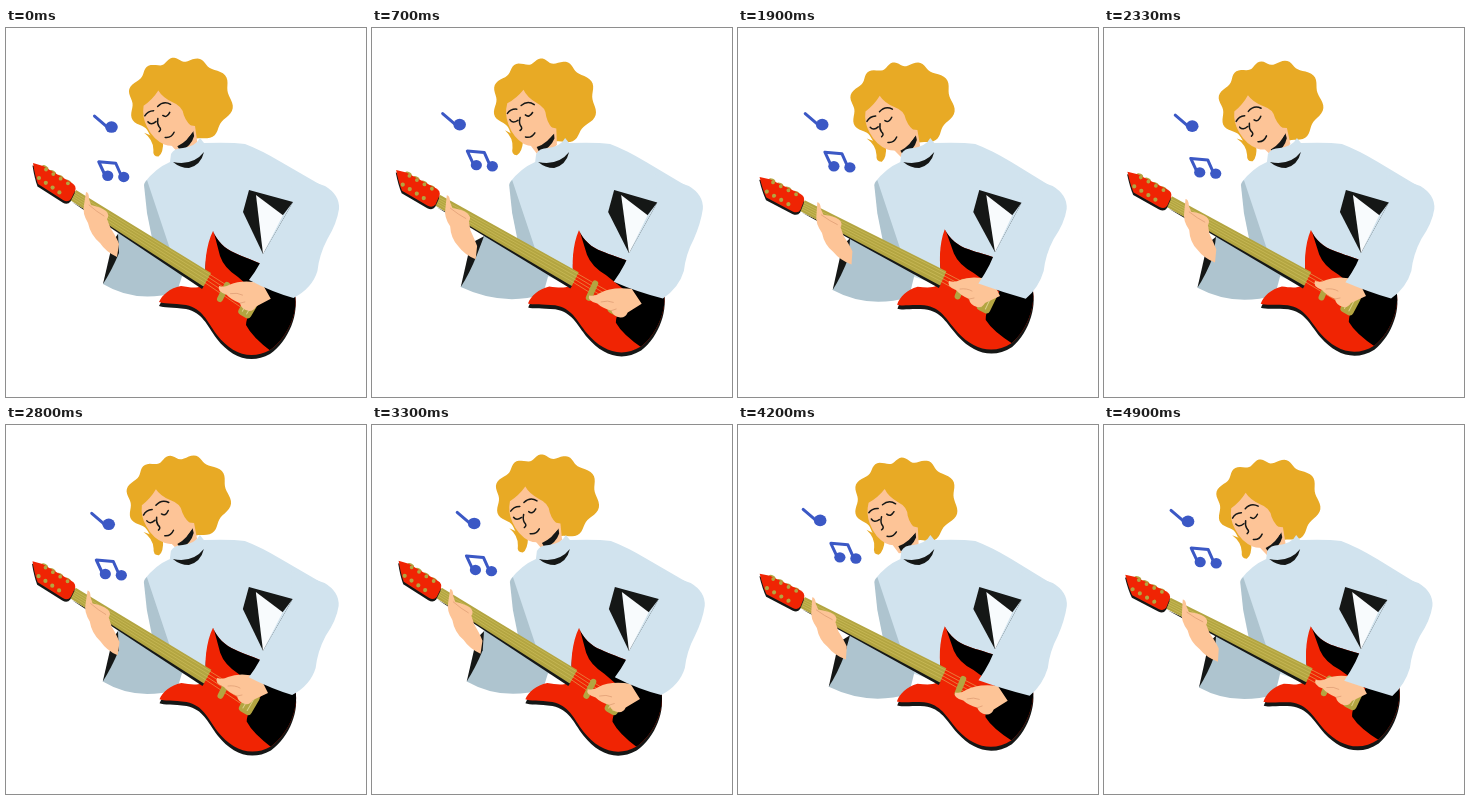
Write an HTML page with a canvas that moves like this. It is 360 px wide and 369 px high and loops after 5 s.

```html
<!DOCTYPE html>
<html lang="en">
<head>
<meta charset="utf-8">
<title>Guitarist</title>
<style>
  html, body { margin: 0; width: 100%; height: 100%; overflow: hidden; background: #fff; }
  canvas { display: block; }
</style>
</head>
<body>
<canvas id="stage" width="360" height="369"></canvas>
<script>
const ctx = document.getElementById('stage').getContext('2d');
const LOOP = 5000, SWAY = 3070;
const INK = '#151716', BLACK = '#000', RED = '#f02403', OLIVE = '#b3a541', SKIN = '#fdc497',
      CREASE = '#dd9b72', HAIR = '#e8aa25', CLOTH = '#d1e3ee', SHADE = '#aec4cf', BLUE = '#3b58c5';
const { sin, cos, PI } = Math;

const fill = (color, path) => { ctx.fillStyle = color; ctx.fill(new Path2D(path)); };
const line = (color, width, path) => {
  ctx.strokeStyle = color;
  ctx.lineWidth = width;
  ctx.stroke(new Path2D(path));
};
const dot = (color, x, y, rx, ry = rx, turn = 0) => {
  ctx.fillStyle = color;
  ctx.beginPath();
  ctx.ellipse(x, y, rx, ry, turn, 0, 2 * PI);
  ctx.fill();
};
const group = (draw) => { ctx.save(); draw(); ctx.restore(); };
const rotateAt = (x, y, angle) => {
  ctx.translate(x, y);
  ctx.rotate(angle);
  ctx.translate(-x, -y);
};

function drawNotes(phase) {
  const x = 91 + 11 * cos(phase) - 1.5 * sin(phase) + 3.5 * cos(2 * phase);
  const y = 97.3 + 2 * cos(phase + .5);
  line(BLUE, 3, `M${x - 17} ${y - 11}L${x - 3} ${y + 1}`);
  dot(BLUE, x, y, 6.3, 5.8);

  const px = 100 + 4.5 * sin(phase + .4);
  const py = 140.5 + 8.5 * cos(phase + .55);
  line(BLUE, 3, `M${px - 2} ${py + 1}l-7 -15l17 1.5l6 13.5`);
  dot(BLUE, px, py, 5.6, 5.2);
  dot(BLUE, px + 16, py + 1.2, 5.6, 5.2);
}

// Curls: a lobed closed curve around the head
function drawCurls() {
  ctx.fillStyle = HAIR;
  ctx.beginPath();
  for (let a = 0; a < 2 * PI; a += .05) {
    const r = 46 + 4.5 * cos(2 * a) + 3 * (cos(a) + sin(a)) + 2.5 * cos(10 * a - 2.1);
    ctx.lineTo(172 + r * cos(a), 70 + r * sin(a));
  }
  ctx.fill();
  fill(HAIR, 'M138 104Q147 111 147 121Q146 128 152 128Q157 125 157 112Z');
}

function drawHead(k, tilt) {
  group(() => {
    ctx.translate(-11 * k, 5 * k);
    rotateAt(172, 75, .09 * tilt);
    drawCurls();
    fill(SKIN, 'M170 95L189 98L191 114Q185 124 172 125L164 116Z');
    fill(INK, 'M171 118Q182 113 187 102L188 108Q185 118 174 123Z');
    fill(SKIN, `M153 62Q147 71 138 77Q136 88 141 98Q147 111 158 116Q168 120 177 113
      Q185 107 189 101Q181 96 178 87Q177 78 167 74Q157 69 153 62Z`);
    line(INK, 1.5, `M139 87Q142 82 148 82M152 78Q158 72 165 76
      M142 93Q145 97 150 93M157 87Q161 90 164 84
      M152 90Q151 95 153 98Q156 101 153 103M159 109Q165 110 168 104`);
  });
}

function drawTorso(k) {
  group(() => {
    ctx.translate(-2 * k, 0);
    fill(CLOTH, `M139 154Q150 140 164 134L165 126Q168 120 177 120Q190 118 194 110L198 115
      Q225 114 239 116Q255 122 275 134L${320 - 3 * k} 160L300 250L200 256L172 247L160 230Z`);
    fill(SHADE, 'M138 157Q138 155 141 152L173 248L160 240L147 215L141 185Z');
    fill(INK, 'M167 134Q187 138 198 124Q195 137 183 140Q174 140 167 134Z');
  });
}

function drawCuff(k, s) {
  const x = 97 - 2 * k - 2.5 * s - 5 * s * s, y = 256 + 7 * k, top = 205 + 5 * k;
  fill(SHADE, `M112 ${top}L${x} ${y}Q130 ${276 + 6 * k} 171 ${264 + 6 * k}L177 245L150 ${215 + 3 * k}Z`);
  fill(INK, `M${x + 10} ${top + 8}L${x} ${y}Q${x + 9} ${y - 14} ${x + 16} ${top + 20}L112 ${top + 1}Z`);
}

function drawGuitar() {
  const body = `M207 203C211 213 219 221 229 225C245 233 277 240 288 263
    C294 280 283 309 264 322C244 333 225 325 211 307C200 292 197 281 180 277
    C167 275 157 276 153 274C156 267 164 260 175 258C187 260 197 262 200 251
    C198 238 200 217 207 203Z`;
  group(() => { ctx.translate(0, 4); fill(INK, body); });
  fill(RED, body);
  group(() => {
    ctx.clip(new Path2D(body));
    fill(BLACK, 'M207 201L214 228Q218 240 232 249L256 270Q240 286 240 297Q246 309 266 324L305 310L300 225Z');
  });

  fill(INK, 'M66 174L110 199L198 258L196 261Z');
  fill(OLIVE, 'M70 162L205 245L197.5 258.5L64 172Z');
  for (let o = -1.5; o < 2; o++) {
    const x = 202 - o * 1.7, y = 251 + o * 2.7;
    line('#d0c15f', .6, `M${67 - o * 1.1} ${167 + o * 1.8}L${x} ${y}`);
    line('#e98a45', .8, `M${x} ${y}L${243 - o * 2.2} ${278 + o * 3}`);
  }
  line(OLIVE, 6, 'M221 257L214 271');
  group(() => {
    rotateAt(243, 278, .54);
    ctx.fillStyle = OLIVE;
    ctx.beginPath();
    ctx.roundRect(236, 267, 14, 23, 4);
    ctx.fill();
    line('#ddd08a', 1, 'M240 271V286M245 271V286');
  });

  const head = 'M27 135L37 138L66 155Q71 158 69 163L65 171Q62 175 57 172L32 156Q29 148 27 135Z';
  for (let i = 0; i < 4; i++) dot(OLIVE, 39 + i * 7.6, 140 + i * 4.8, 3.6, 2.4, .5);
  group(() => { ctx.translate(-.5, 2.5); fill(INK, head); });
  fill(RED, head);
  for (let i = 0; i < 4; i++) {
    dot(OLIVE, 33 + i * 6.8, 150 + i * 4.8, 2.1);
    dot(OLIVE, 40 + i * 7.3, 141.5 + i * 4.6, 1.9);
  }
}

function drawFretHand(s) {
  const w = -1 - 5 * s * s;
  group(() => {
    ctx.translate(-3.5 * s, -1.5 * s - 1);
    fill(SKIN, `M80 165Q83 165 83 172L85 178Q95 180 100 184Q104 188 101 192L${105 + w / 2} 201
      Q${112 + w} 211 ${114 + w} 217L${112 + w} 230Q${101 + w} 225 ${95 + w} 216
      Q${85 + w / 2} 208 82 196Q76 186 78 178Z`);
    line(CREASE, .7, 'M83 178Q91 185 98 189');
  });
}

// Strum runs from -1 (raised) to 1 (lowered)
function drawStrumHand(strum) {
  const k = (strum + 1) / 2;
  group(() => {
    ctx.translate(7 * k, 9 * k);
    rotateAt(252, 262, -.13 * k);
    fill(SKIN, `M211 253Q217 255 222 252Q234 247 254 252L262 268L247 275Q244 280 239 279
      Q232 277 231 271Q222 267 218 262Q208 258 211 253Z`);
    line(CREASE, .7, 'M222 261Q229 260 234 263M231 271L236 270');
  });
}

function drawArm(k, strum) {
  group(() => {
    ctx.translate(-2 * k, 0);
    const e = -3 * k, low = 2 * strum;
    fill(CLOTH, `M${285 + e} 146L${319 + e} 158Q${334 + e} 167 ${333 + e} 181Q${331 + e} 195 ${322 + e + low} 211
      Q${314 + e + low} 226 ${312 + e + low} 243Q${307 + e + low} 260 ${288 + 4 * k + low} ${270 + k}
      Q266 264 ${243 - k} ${252 + 4 * k}Q256 235 259 222L287 174Z`);
    const right = `${287 - 2 * k} ${174 + k}`, tip = `${257 + 2 * k} ${226 - 2 * k}`;
    fill(INK, `M243 162L${right}L${tip}L237 184Z`);
    fill('#f8fbfd', `M250 167L${278 - k} 188L${tip}Z`);
    fill(CLOTH, `M${right}L${tip}L${277 - k} 187Z`);
  });
}

// Fifteen steps a second, with a longer hold at the start of every 700 ms
function stepTime(ms) {
  const block = Math.floor(ms / 700) * 700, step = 200 / 3;
  const i = Math.floor((ms - block - step / 2 + .01) / step);
  return i > 0 ? block + step * (i + .5) : block;
}

function draw(time) {
  const phase = 2 * PI * time / SWAY, lag = phase - .4;
  const k = (1 - cos(phase)) / 2, s = sin(phase);
  const strum = Math.max(-1, Math.min(1, 1.8 * sin(phase - .16)));

  ctx.fillStyle = '#fff';
  ctx.fillRect(0, 0, 360, 369);
  ctx.lineCap = ctx.lineJoin = 'round';
  drawNotes(phase);
  drawHead((1 - cos(lag)) / 2, sin(phase - .2));
  drawTorso(k);
  drawCuff(k, s);
  group(() => {
    rotateAt(187, 205, -.1 * k);
    drawGuitar();
    drawFretHand(s);
  });
  drawStrumHand(strum);
  drawArm(k, strum);
}

const start = performance.now();
function tick() {
  draw(stepTime((performance.now() - start) % LOOP));
  requestAnimationFrame(tick);
}
tick();
</script>
</body>
</html>
```
